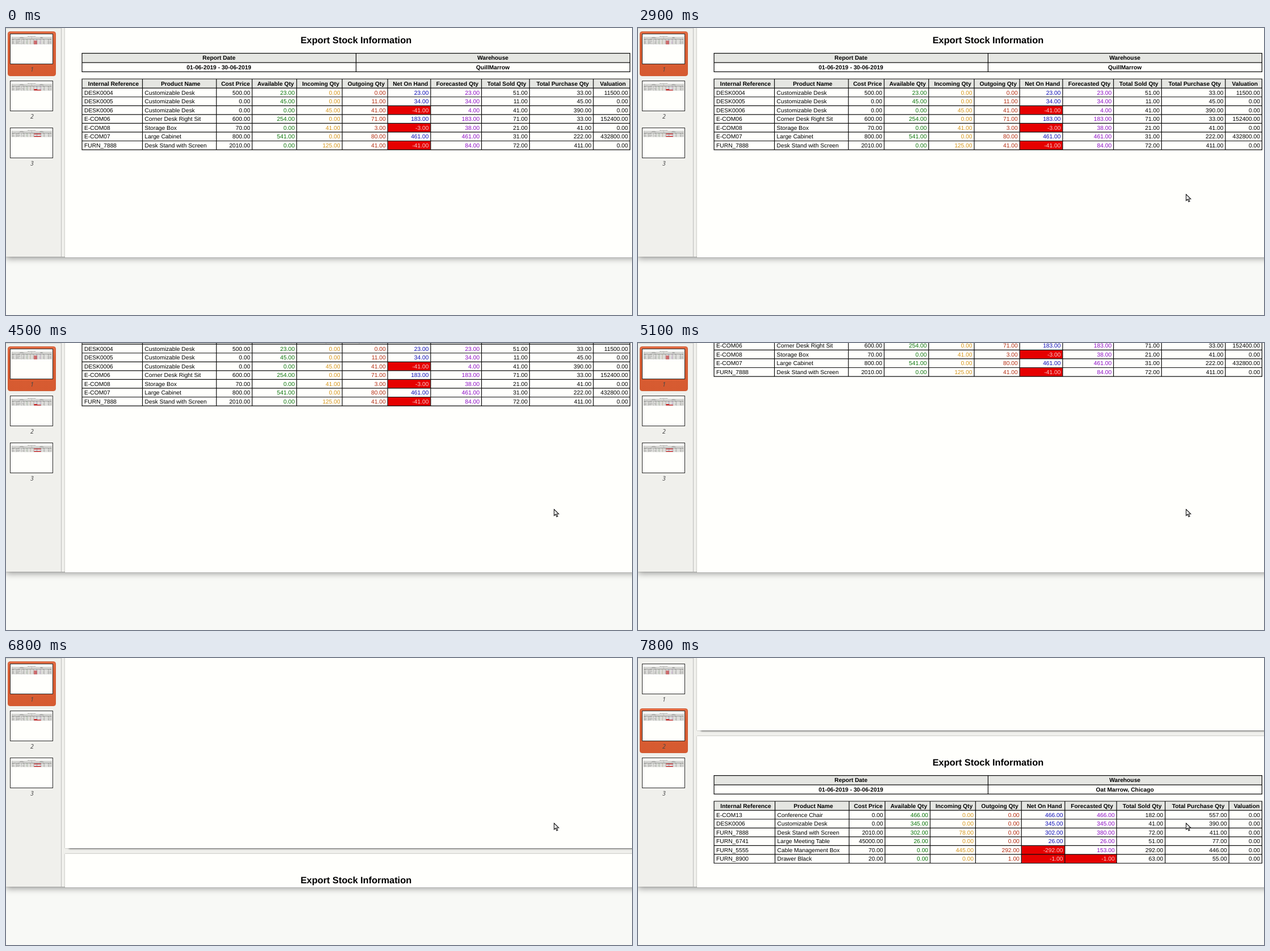
Write an HTML page that moves like this. It is 1104 by 507 pixels and loops after 8 s.

```html
<!DOCTYPE html>
<html lang="en">
<head>
<meta charset="utf-8">
<title>Stock report preview</title>
<style>
  html, body { margin: 0; width: 100%; height: 100%; overflow: hidden; background: #f8f9f6; }
  body { position: relative; }
  div, svg { position: absolute; }

  #viewer { left: 0; top: 0; width: 1130px; height: 404px; background: #f0f0ec;
    box-shadow: 0 3px 11px rgba(0, 0, 0, .4), 0 0 2px rgba(0, 0, 0, .25); }
  #doc { left: 98px; top: 0; width: 1006px; height: 405px; overflow: hidden; clip-path: inset(0 0 .6px 0); }
  #pages { left: 0; top: 0; animation: scroll 8s step-end infinite; }
  .page { left: 6px; width: 1027px; height: 725px; background: #fffffc;
    box-shadow: 0 0 1.5px rgba(0, 0, 0, .5), 4px 4px 3px -3px rgba(0, 0, 0, .6); }
  .page svg { left: 0; top: 0; }

  #side { left: 0; top: 0; width: 97px; height: 404px; border-right: 1px solid #bdbdba; }
  #side::before { content: ""; position: absolute; left: 0; top: 0; width: 97px; height: 1px; background: #d3d3cf; }
  #mark { left: 3px; top: 6px; width: 83px; height: 77px; border: 1px solid #cf5a33; border-radius: 4px;
    background: linear-gradient(#e26d45, #d95f35 25%, #d65a30);
    animation: mark 8s step-end infinite; }
  .thumb { left: 7px; width: 74px; height: 52px; border: 1px solid #2a2a2a; background: #fffffc; }
  .thumb svg { left: 0; top: 0; }
  .thumb .grid { stroke-width: 2.2; }
  .label { left: 26px; width: 40px; text-align: center; color: #484848;
    font: italic 10.5px/14px "Noto Sans", "Open Sans", sans-serif; }

  text { font: 10.25px "Liberation Sans", Arial, sans-serif; text-rendering: geometricPrecision; }
  .b { font-weight: bold; text-anchor: middle; }
  .n { text-anchor: end; }
  .title { font-size: 16.4px; }
  .grid { fill: none; stroke: #0c0c0c; stroke-width: 1.2; }

  #cursor { left: 0; top: 0; animation: move 8s step-end infinite; }

  @keyframes scroll {
    0% { transform: none; }
    47.5% { transform: translateY(-52px); }
    56.25% { transform: translateY(-104px); }
    63.75% { transform: translateY(-156px); }
    73.75% { transform: translateY(-260px); }
    77.5% { transform: translateY(-312px); }
    81.25% { transform: translateY(-364px); }
    87.5% { transform: translateY(-416px); }
    92.5% { transform: translateY(-520px); }
    97.5%, 100% { transform: translateY(-572px); }
  }
  @keyframes mark {
    0% { transform: none; }
    92.5%, 100% { transform: translateY(83px); }
  }
  @keyframes move {
    0% { opacity: 0; transform: translate(186px, 63px); }
    6.25% { opacity: 1; transform: translate(186px, 63px); }
    7.5% { opacity: 1; transform: translate(186px, 63px); animation-timing-function: steps(9); }
    18.75% { opacity: 1; transform: translate(748px, 174px); animation-timing-function: steps(6); }
    26.25% { opacity: 1; transform: translate(1021px, 320px); animation-timing-function: steps(2); }
    28.75% { opacity: 1; transform: translate(1010px, 333px); }
    31.25% { opacity: 1; transform: translate(1010px, 333px); animation-timing-function: steps(4); }
    36.25% { opacity: 1; transform: translate(966px, 293px); }
    65% { opacity: 1; transform: translate(966px, 293px); animation-timing-function: steps(2); }
    67.5% { opacity: 1; transform: translate(967px, 290px); }
    85%, 100% { opacity: 1; transform: translate(966px, 291px); }
  }
</style>
</head>
<body>
<div id="viewer">
  <div id="side"><div id="mark"></div></div>
  <div id="doc"><div id="pages"></div></div>
</div>
<svg id="cursor" width="12" height="17">
  <path d="M.6 .8V12L3.2 9.6 5.1 14.1 7 13.3 5.1 9H8.8Z" fill="#fff" stroke="#1a1a1a" stroke-width="1.15"/>
</svg>
<script>
  const HEADS = ['Internal Reference', 'Product Name', 'Cost Price', 'Available Qty', 'Incoming Qty',
    'Outgoing Qty', 'Net On Hand', 'Forecasted Qty', 'Total Sold Qty', 'Total Purchase Qty', 'Valuation'];
  const INKS = ['#000', '#000', '#000', '#0b750b', '#d6951a', '#b32a10', '#0b0bb8', '#8c0bc6', '#000', '#000', '#000'];
  const TOP = 90.5, FIRST = 106.7, ROW = 15.55;

  const desks = {
    place: 'QuillMarrow',
    cols: [134.5, 241, 371.5, 434.5, 513, 593.3, 673.5, 749.3, 839, 923.7, 1036.2, 1100.8],
    rows: [
      'DESK0004|Customizable Desk|500|23|0|0|23|23|51|33|11500',
      'DESK0005|Customizable Desk|0|45|0|11|34|34|11|45|0',
      'DESK0006|Customizable Desk|0|0|45|41|-41|4|41|390|0',
      'E-COM06|Corner Desk Right Sit|600|254|0|71|183|183|71|33|152400',
      'E-COM08|Storage Box|70|0|41|3|-3|38|21|41|0',
      'E-COM07|Large Cabinet|800|541|0|80|461|461|31|222|432800',
      'FURN_7888|Desk Stand with Screen|2010|0|125|41|-41|84|72|411|0']
  };
  const chairs = {
    place: 'Oat Marrow, Chicago',
    cols: [134.5, 242, 372.7, 436, 515.6, 595.7, 676.6, 753.2, 844.5, 930, 1042.5, 1100.8],
    rows: [
      'E-COM13|Conference Chair|0|466|0|0|466|466|182|557|0',
      'DESK0006|Customizable Desk|0|345|0|0|345|345|41|390|0',
      'FURN_7888|Desk Stand with Screen|2010|302|78|0|302|380|72|411|0',
      'FURN_6741|Large Meeting Table|45000|26|0|0|26|26|51|77|0',
      'FURN_5555|Cable Management Box|70|0|445|292|-292|153|292|446|0',
      'FURN_8900|Drawer Black|20|0|0|1|-1|-1|63|55|0']
  };
  const last = { ...chairs, rows: [5, 0, 1, 3, 5].map(i => chairs.rows[i]) };

  const text = (x, y, s, cls = '', ink = '#000') =>
    `<text x="${x}" y="${y}" class="${cls}" fill="${ink}">${s}</text>`;
  const rect = (x, y, w, h, fill) =>
    `<rect x="${x}" y="${y}" width="${w}" height="${h}" fill="${fill}"/>`;
  const grid = (xs, ys) => {
    const x2 = xs[xs.length - 1], y2 = ys[ys.length - 1];
    return `<path class="grid" stroke-linecap="square" d="${
      xs.map(x => `M${x} ${ys[0]}V${y2}`).join('') + ys.map(y => `M${xs[0]} ${y}H${x2}`).join('')}"/>`;
  };

  function cell(s, c, y, cols) {
    const base = y + 11.4;
    if (c < 2) return text(cols[c] + 4, base, s);
    const x = cols[c + 1], red = s[0] === '-';
    return (red ? rect(cols[c], y, x - cols[c], ROW, '#e60000') : '') +
      text(x - 3.4, base, s + '.00', 'n', red ? '#f8cfcf' : INKS[c]);
  }

  // The view box is nudged a fraction of a pixel so the sheet sits right inside its page.
  function sheet({ place, cols, rows }, width) {
    const left = cols[0], right = cols[11], mid = 617.8;
    const lines = [TOP, ...Array.from({ length: rows.length + 1 }, (_, i) => FIRST + i * ROW)];
    const body = rows.map((r, i) =>
      r.split('|').map((s, c) => cell(s, c, lines[i + 1], cols)).join('')).join('');
    const heads = HEADS.map((h, c) => text((cols[c] + cols[c + 1]) / 2 + 2.2, 102.1, h, 'b')).join('');
    return `<svg width="${width}" height="${width * 726 / 1027}" viewBox="104.4 -24.5 1027 726">` +
      text(617.7, 27.2, 'Export Stock Information', 'b title') +
      rect(left, 45, right - left, 16.5, '#e5e6e2') +
      text(376, 56.9, 'Report Date', 'b') + text(859, 56.9, 'Warehouse', 'b') +
      text(376, 73.2, '01-06-2019 - 30-06-2019', 'b') + text(859, 73.2, place, 'b') +
      grid([left, mid, right], [45.2, 61.6, 77.9]) +
      rect(left, TOP, right - left, FIRST - TOP, '#e5e6e2') +
      heads + body + grid(cols, lines) + '</svg>';
  }

  const add = (id, html) => document.getElementById(id).insertAdjacentHTML('beforeend', html);
  [desks, chairs, last].forEach((data, i) => {
    add('pages', `<div class="page" style="top:${i * 735 - 25}px">${sheet(data, 1027)}</div>`);
    add('side', `<div class="thumb" style="top:${10 + i * 83}px">${sheet(data, 74.5)}</div>` +
      `<div class="label" style="top:${66 + i * 83}px">${i + 1}</div>`);
  });
</script>
</body>
</html>
```
